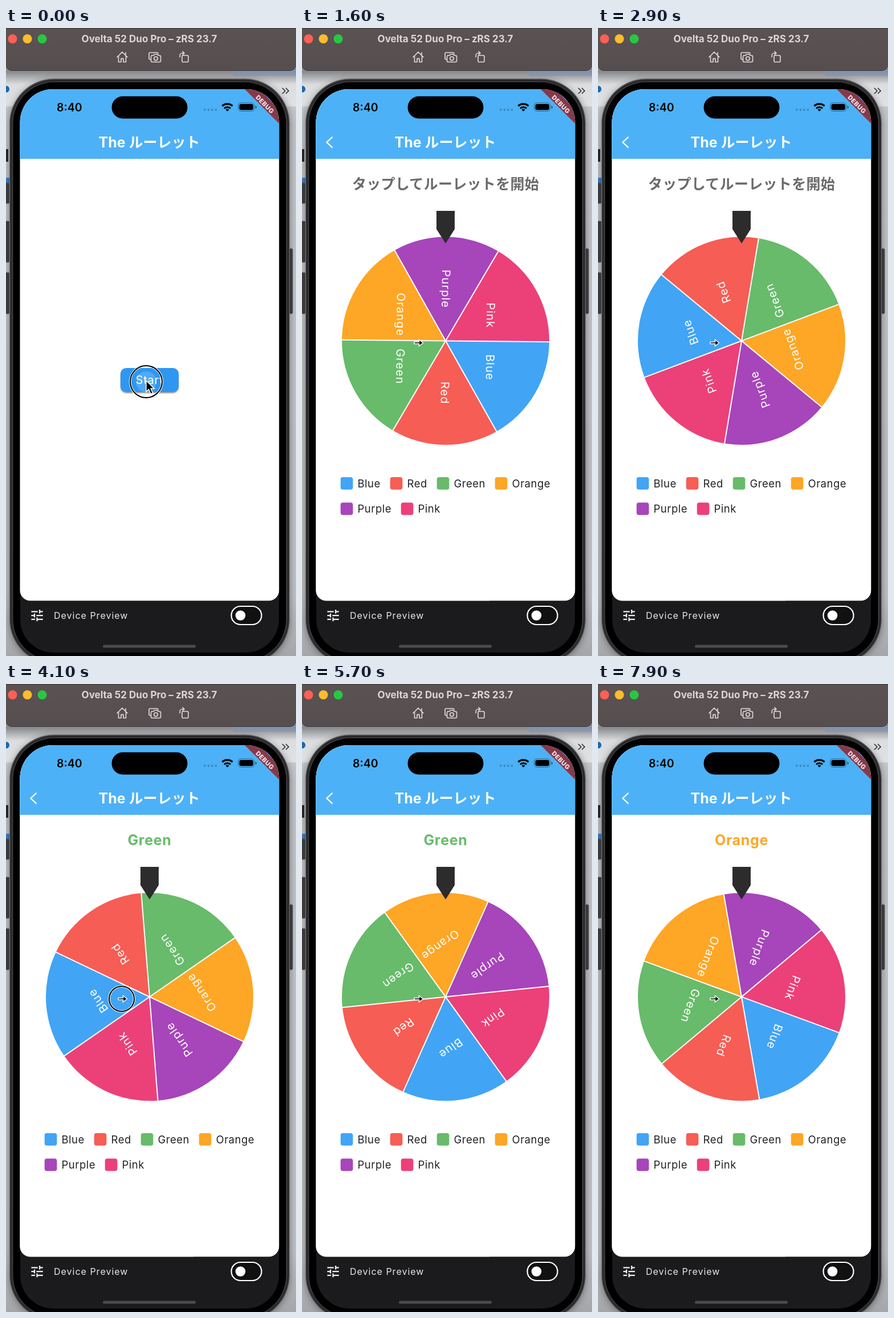
Animation of 509x1099 px, one loop 8000 ms. Source, as an HTML page:

```html
<!DOCTYPE html>
<html lang="ja">
<head>
<meta charset="utf-8">
<title>Roulette</title>
<style>
html, body { margin: 0; width: 100%; height: 100%; overflow: hidden; background: #c3c5c8; }
svg { display: block; width: 100vw; height: 100vh; font-family: Inter, "Noto Sans CJK JP", "Noto Sans CJK", sans-serif; }
.mid { text-anchor: middle; }
.bold { font-weight: 700; }
.line { fill: none; stroke: #e2dede; stroke-width: 1.6; stroke-linejoin: round; stroke-linecap: round; }
</style>
</head>
<body>
<svg viewBox="0 0 509 1099" preserveAspectRatio="none">
  <defs>
    <linearGradient id="desk" x2="0" y2="1">
      <stop offset="0" stop-color="#77787b"/>
      <stop offset=".07" stop-color="#8a8b8e"/>
      <stop offset=".09" stop-color="#dcdddf"/>
      <stop offset=".124" stop-color="#e0e1e3"/>
      <stop offset=".126" stop-color="#c3c5c8"/>
      <stop offset=".9" stop-color="#c0c2c5"/>
      <stop offset="1" stop-color="#a4a6a9"/>
    </linearGradient>
    <linearGradient id="bar" x2="0" y2="1">
      <stop offset="0" stop-color="#5b5353"/>
      <stop offset="1" stop-color="#564e4e"/>
    </linearGradient>
    <clipPath id="screen">
      <path d="M24.500 165A58 58 0 0 1 83 107H421A58 58 0 0 1 479.300 165V984A18 18 0 0 1 461 1002.300H43A18 18 0 0 1 24.500 984Z"/>
    </clipPath>
    <filter id="soft" x="-20%" y="-20%" width="140%" height="160%">
      <feGaussianBlur stdDeviation="1.2"/>
    </filter>
    <filter id="shade" x="-10%" y="-10%" width="120%" height="120%">
      <feGaussianBlur stdDeviation="7"/>
    </filter>
    <clipPath id="buttonClip"><rect x="201" y="595" width="102" height="42" rx="10"/></clipPath>
  </defs>

  <!-- desktop behind the simulator -->
  <rect width="509" height="1099" fill="url(#desk)"/>
  <rect x="398" y="70" width="111" height="14" fill="#7f96bd" opacity=".6"/>
  <circle cx="0" cy="107" r="6" fill="#1c67ac"/>
  <rect y="212" width="4" height="22" fill="#2b2b2d"/>
  <rect y="262" width="6" height="9" fill="#3f82c4"/>
  <path d="M485 105l5 5-5 5M491 105l5 5-5 5" fill="none" stroke="#333" stroke-width="1.7"/>
  <rect x="6" y="92" width="492" height="1022" rx="78" opacity=".4" filter="url(#shade)"/>

  <!-- simulator toolbar -->
  <path d="M0 0H509V65A10 10 0 0 1 499 75H10A10 10 0 0 1 0 65Z" fill="#3c3738"/>
  <path d="M0 1H509V64A10 10 0 0 1 499 74H10A10 10 0 0 1 0 64Z" fill="url(#bar)"/>
  <circle cx="11.500" cy="19" r="8" fill="#fe5f57"/>
  <circle cx="37.500" cy="19" r="8" fill="#febc2e"/>
  <circle cx="63.500" cy="19" r="8" fill="#28c840"/>
  <text class="mid bold" x="251.500" y="24.700" font-size="17" fill="#dcd8d8">Ovelta 52 Duo Pro – zRS 23.7</text>
  <g class="line">
    <path d="M195 51l9-9 9 9M197.500 49v10.500h4.500v-6h4v6h4.500V49M210 47v-4"/>
    <path d="M254 55h-1a2 2 0 0 1-2-2v-8a2 2 0 0 1 2-2h12a2 2 0 0 1 2 2"/>
    <path d="M256.500 48h2.500l1.500-2h5l1.500 2h2.500a2 2 0 0 1 2 2v7.500a2 2 0 0 1-2 2h-13a2 2 0 0 1-2-2V50a2 2 0 0 1 2-2Z"/>
    <circle cx="263" cy="53.500" r="3.200"/>
    <rect x="309" y="48" width="11" height="11.500" rx="1.500"/>
    <path d="M305 51v-2.500a4.500 4.500 0 0 1 4.500-4.500h3M310 41l3 3-3 3"/>
  </g>

  <!-- phone body -->
  <g fill="#39393b" stroke="#555658">
    <rect x="-3" y="271" width="9" height="36" rx="2"/>
    <rect x="-3" y="338" width="9" height="72" rx="2"/>
    <rect x="-3" y="428" width="9" height="72" rx="2"/>
    <rect x="497" y="386" width="6" height="114" rx="2"/>
    <rect x="6.500" y="89" width="491" height="1024" rx="78" stroke="#6a6b6d"/>
  </g>
  <rect x="9" y="92" width="486" height="1018" rx="76" fill="none" stroke="#252527" stroke-width="2"/>
  <rect x="12.500" y="95" width="479" height="1012" rx="72"/>
  <rect x="25" y="107" width="454" height="986" rx="58" fill="#1b1b1d"/>
  <rect x="170" y="1079.500" width="163" height="5" rx="2.500" fill="#4b4b4d"/>
  <path transform="translate(41 1014.500) scale(1.130)" fill="#f0f0f0" d="M3 17v2h6v-2H3zM3 5v2h10V5H3zm10 16v-2h8v-2h-8v-2h-2v6h2zM7 9v2H3v2h4v2h2V9H7zm14 4v-2H11v2h10zm-6-4h2V7h4V5h-4V3h-2v6z"/>
  <text x="84" y="1034" font-size="16" letter-spacing="1" fill="#e8e8e8">Device Preview</text>
  <rect x="395.500" y="1012" width="53" height="32" rx="16" fill="#111" stroke="#fff" stroke-width="2.200"/>
  <circle cx="411.500" cy="1028" r="8.800" fill="#fff"/>

  <!-- app -->
  <g clip-path="url(#screen)">
    <g id="home">
      <rect x="24" y="107" width="456" height="896" fill="#fff"/>
      <g class="appbar"></g>
      <rect x="201" y="597" width="102" height="42" rx="10" fill="#8a9199" filter="url(#soft)"/>
      <rect x="201" y="595" width="102" height="42" rx="10" fill="#2f97f2"/>
      <g clip-path="url(#buttonClip)"><circle id="ripple" cx="246" cy="619" fill="#fff"/></g>
      <text class="mid" x="252" y="622.500" font-size="20" letter-spacing=".7" fill="#fff">Start</text>
    </g>
    <g id="game">
      <rect x="24" y="107" width="456" height="896" fill="#fff"/>
      <g class="appbar"></g>
      <path d="M53.500 190.500L43.500 200l10 9.500" fill="none" stroke="#fff" stroke-width="2.400"/>
      <text id="result" class="mid bold" x="252" y="282" font-size="25"></text>
      <g transform="translate(252 547.500)"><g id="wheel"></g></g>
      <path d="M236 320H268V352L252 377L236 352Z" fill="#2c2c2c"/>
      <g id="legend"></g>
    </g>
    <path d="M419 107H444L479.500 142V167.500Z" fill="#86394a"/>
    <text class="mid" transform="translate(454.500 133.500) rotate(45)" y="4" font-size="11" font-weight="800" letter-spacing=".4" fill="#f4e9ec">DEBUG</text>
    <text x="89" y="145.700" font-size="19.500" font-weight="600">8:40</text>
    <rect x="185.500" y="119.500" width="133" height="39" rx="19.500"/>
    <g fill="#3c8cc4">
      <circle cx="349" cy="143" r="2"/><circle cx="355.500" cy="143" r="2"/>
      <circle cx="362" cy="143" r="2"/><circle cx="368.500" cy="143" r="2"/>
    </g>
    <g fill="none" stroke="#000" stroke-width="3.200">
      <path d="M379.500 136.500a13 13 0 0 1 18 0M383 140.700a8 8 0 0 1 11 0"/>
    </g>
    <path d="M385.500 143a4.500 4.500 0 0 1 6 0l-3 3Z"/>
    <rect x="407.500" y="131" width="28.500" height="14.500" rx="4.500" fill="none" stroke="#2a648d"/>
    <rect x="409.500" y="133" width="24.500" height="10.500" rx="3"/>
    <path d="M437.500 136a2.500 2.500 0 0 1 0 5Z" fill="#2a648d"/>
  </g>

  <!-- mouse -->
  <g id="ring" fill="none">
    <circle stroke="#fff" stroke-width="4"/>
    <circle stroke="#000" stroke-width="2"/>
  </g>
  <g id="cursor" stroke="#fff">
    <path id="pointer" stroke-width="1.500" d="M0 0V19.500L4.600 15.300L8 23.500L11.700 22L8.300 14H14.300Z"/>
    <path id="arrow" stroke-width="1.400" d="M-7 -1.500H1.500V-5.500L8.500 0L1.500 5.500V1.500H-7Z"/>
  </g>
</svg>
<script>
const LOOP = 8000, STEP = 100, SPIN = 2000, RADIUS = 182;
const $ = id => document.getElementById(id);
const clamp = v => Math.min(1, Math.max(0, v));

const slices = [
  ["Blue", "#42a4f5", 68, 786], ["Red", "#f65d54", 155, 786],
  ["Green", "#67bb6a", 237, 786], ["Orange", "#fea625", 339, 786],
  ["Purple", "#a745ba", 68, 830.5], ["Pink", "#ec4079", 174, 830.5],
];
const spins = [
  { start: 1584, from: 0, to: 4105.4 },
  { start: 4418.3, from: 145.4, to: 4022 },
  { start: 6941.3, from: 62, to: 4336.5 },
];
const prompt = ["タップしてルーレットを開始", "#6b6b6b"];
const clicks = [[-300, 200], [1300, 1560], [4060, 4400], [6600, 6930]];

function bezier(x1, y1, x2, y2) {
  const at = (a, b, s) => 3 * (1 - s) ** 2 * s * a + 3 * (1 - s) * s * s * b + s ** 3;
  return x => {
    let lo = 0, hi = 1;
    for (let i = 0; i < 30; i++) {
      const s = (lo + hi) / 2;
      if (at(x1, x2, s) < x) lo = s; else hi = s;
    }
    return at(y1, y2, lo);
  };
}
const spinEase = bezier(0.4, 0, 0.2, 1);
const pageEase = bezier(0.35, 0.91, 0.33, 0.97);
const moveEase = bezier(0.42, 0, 0.58, 1);

function build() {
  for (const bar of document.querySelectorAll(".appbar")) {
    bar.innerHTML = `<rect x="24" y="107" width="456" height="122" fill="#4db1f7"/>
      <g class="bold" fill="#fff" font-size="25"><text x="162.500" y="208.500">The</text>
      <text x="215.500" y="208.500">ルーレット</text></g>`;
  }
  const edge = deg => {
    const a = deg * Math.PI / 180;
    return `${RADIUS * Math.cos(a)} ${RADIUS * Math.sin(a)}`;
  };
  const fills = slices.map(([, color], i) =>
    `<path fill="${color}" d="M0 0L${edge(i * 60)}A${RADIUS} ${RADIUS} 0 0 1 ${edge(i * 60 + 60)}Z"/>`);
  const spokes = slices.map((_, i) =>
    `<path stroke="#fff" stroke-width="2" d="M0 0L${edge(i * 60)}"/>`);
  const labels = slices.map(([name], i) => {
    const a = (i * 60 + 30) * Math.PI / 180, r = RADIUS / 2;
    return `<text class="mid" fill="#fff" font-size="20" letter-spacing="1" y="7.300"
      transform="translate(${r * Math.cos(a)} ${r * Math.sin(a)}) rotate(90)">${name}</text>`;
  });
  $("wheel").innerHTML = [...fills, ...spokes, ...labels].join("");
  $("legend").innerHTML = slices.map(([name, color, x, y]) =>
    `<rect x="${x - 0.3}" y="${y}" width="21.700" height="21.700" rx="4" fill="${color}"/>
     <text x="${x + 29.5}" y="${y + 17.7}" font-size="18.500" letter-spacing=".5" fill="#222">${name}</text>`).join("");
}

function wheelAngle(t) {
  const spin = spins.filter(s => t >= s.start).pop();
  return spin ? spin.from + (spin.to - spin.from) * spinEase(clamp((t - spin.start) / SPIN)) : 0;
}

function resultAt(t) {
  if (t >= spins[1].start + SPIN) return slices[3];
  return t >= spins[0].start + SPIN ? slices[2] : prompt;
}

function render(t) {
  const page = t < 250 ? 0 : pageEase(clamp((t - 250) / 500));
  $("home").setAttribute("transform", `translate(${-151 * page} 0)`);
  $("game").setAttribute("transform", `translate(${456 * (1 - page)} 0)`);
  $("ripple").setAttribute("r", 18 + 70 * clamp(t / 300));
  $("ripple").setAttribute("opacity", 0.17 * (1 - clamp((t - 150) / 250)));

  $("wheel").setAttribute("transform", `rotate(${wheelAngle(t) % 360})`);
  const [text, color] = resultAt(t);
  const result = $("result");
  if (result.textContent !== text) result.textContent = text;
  result.setAttribute("fill", color);
  result.setAttribute("letter-spacing", text === prompt[0] ? 0.3 : 0.7);

  const move = moveEase(clamp((t - 500) / 600));
  const x = 246 - 42 * move, y = 617 - 66 * move;
  $("cursor").setAttribute("transform", `translate(${x} ${y})`);
  $("pointer").style.display = move < 1 ? "" : "none";
  $("arrow").style.display = move < 1 ? "none" : "";

  const click = clicks.find(([down, up]) => t >= down && t < up);
  const ring = $("ring");
  ring.style.display = click ? "" : "none";
  if (click) {
    const r = 18 + 10 * clamp((t - click[0]) / 100);
    ring.setAttribute("transform", move < 1 ? "translate(246 619)" : "translate(203 551)");
    for (const c of ring.children) c.setAttribute("r", r);
  }
}

function frame() {
  const t = (performance.now() + 5) % LOOP;
  render(Math.floor(t / STEP) * STEP);
  requestAnimationFrame(frame);
}
build();
frame();
</script>
</body>
</html>
```
